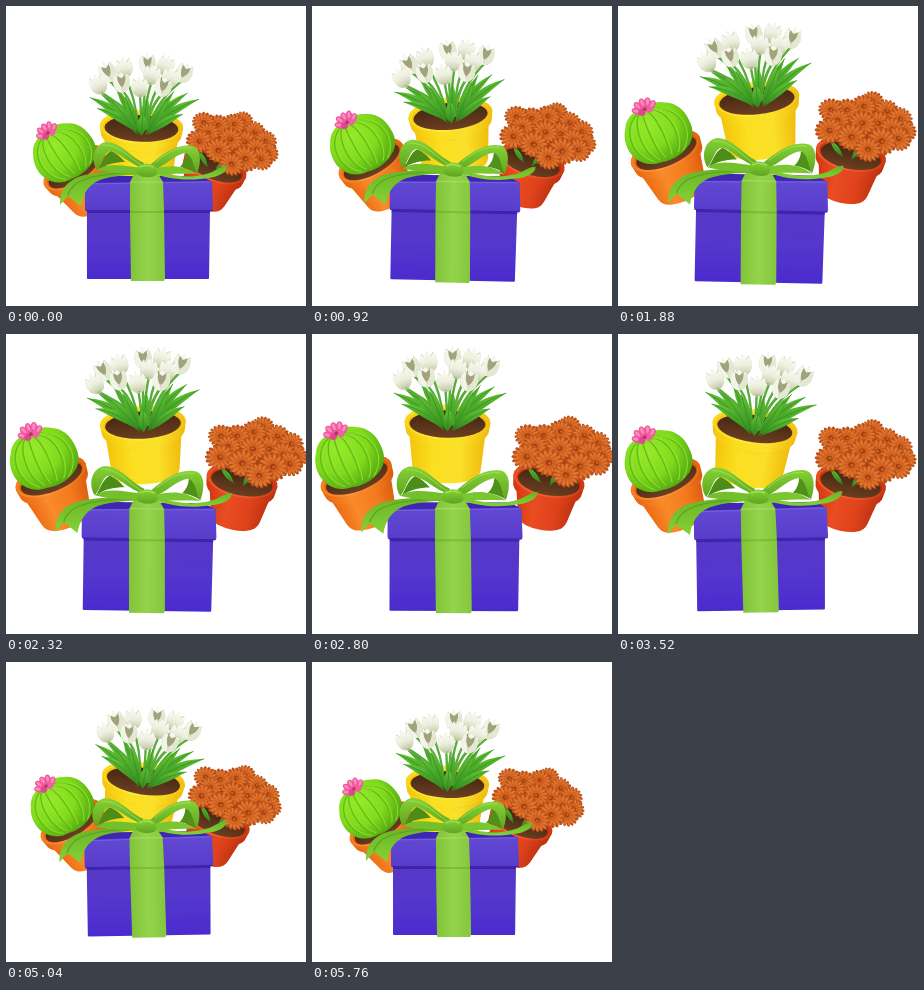
An HTML page for the animation above (5.8 s loop, 300x300 px).

```html
<!DOCTYPE html>
<html lang="en">
<head>
<meta charset="utf-8">
<title>Gift with potted flowers</title>
<style>
html, body { margin: 0; width: 100%; height: 100%; overflow: hidden; background: #fff; }
svg { display: block; width: 100vw; height: 100vh; }
</style>
</head>
<body>
<svg id="stage" viewBox="0 0 300 300" xmlns="http://www.w3.org/2000/svg"></svg>
<script>
const LOOP = 5800;
const TAU = Math.PI * 2;
const stage = document.getElementById('stage');

const path = (d, fill, extra = '') => `<path d="${d}" fill="${fill}" ${extra}/>`;
const line = (d, color, width) =>
  `<path d="${d}" fill="none" stroke="${color}" stroke-width="${width}" stroke-linecap="round"/>`;
const oval = (x, y, rx, ry, fill, extra = '') =>
  `<ellipse cx="${x}" cy="${y}" rx="${rx}" ry="${ry}" fill="${fill}" ${extra}/>`;
const stops = colors => colors.map((c, i) =>
  `<stop offset="${i / (colors.length - 1)}" stop-color="${c}"/>`).join('');
const across = (id, ...colors) => `<linearGradient id="${id}">${stops(colors)}</linearGradient>`;
const down = (id, ...colors) =>
  `<linearGradient id="${id}" x2="0" y2="1">${stops(colors)}</linearGradient>`;
const ring = (n, turn, draw) => Array.from({ length: n }, (_, i) =>
  `<g transform="rotate(${turn + i * 360 / n})">${draw}</g>`).join('');

const defs = `<defs>
  ${across('yellow', '#f3c30c', '#fbdf20', '#fbe02a', '#efb90a')}
  ${across('yellowRim', '#fbd514', '#fdea3e', '#fce02a', '#f3c010')}
  ${across('orange', '#e9650f', '#f98a2a', '#f47b1e', '#d8590d')}
  ${across('orangeRim', '#f47c1e', '#fc983e', '#f68326', '#e4660f')}
  ${across('red', '#cf3510', '#ea4d22', '#e0431c', '#b9300f')}
  ${across('redRim', '#ea4f20', '#f46834', '#ec5325', '#c93812')}
  ${down('soil', '#41220f', '#6b3f22')}
  ${down('front', '#5639c6', '#5437cc', '#4b2bce')}
  ${down('lid', '#6149d2', '#583dcc')}
  ${across('band', '#80c238', '#94d44c', '#84c63c')}
  ${down('loop', '#86d236', '#5da51f')}
  ${down('tail', '#69b325', '#84d236')}
  ${down('leaf', '#63c235', '#2f8a1d')}
  ${down('petal', '#fafbf4', '#eceedd', '#bfc7a2')}
  <radialGradient id="cactusSkin" cx=".42" cy=".3" r=".75">
    <stop offset="0" stop-color="#98ea2a"/><stop offset=".55" stop-color="#80da1c"/>
    <stop offset="1" stop-color="#4fa30f"/>
  </radialGradient>
  <g id="daisyHead">
    ${ring(17, 0, oval(0, -9.5, 2.1, 5, '#b85018'))}
    ${ring(15, 9, oval(0, -8, 1.6, 5, '#de742f'))}
    ${ring(11, 4, oval(0, -4.8, 1.3, 3.6, '#d0601f'))}
    ${oval(0, 0, 3, 2.8, '#9b3d12')}
    ${oval(-.4, -.6, 1.7, 1.5, '#c9611f')}
  </g>
  <g id="tulipHead">
    ${path('M-6-9C-11-1-9 10 0 11C9 10 11-1 6-9L2-5L0-11L-3-5Z', '#d5dabd')}
    ${path('M-6.5-8C-11 0-8 10 0 11C0 2-2-4-6.5-8Z', 'url(#petal)')}
    ${path('M6.5-8C11 0 8 10 0 11C0 2 2-4 6.5-8Z', 'url(#petal)')}
    ${path('M0-10C-7-4-6 7 0 11C6 7 7-4 0-10Z', 'url(#petal)')}
    ${path('M-3.5 6C-2 10 2 10 3.5 6L0 11Z', '#a3ab7d')}
  </g>
  <g id="tulipOpen">
    <use href="#tulipHead"/>
    ${path('M-4-7C-5 0-2 4 0 5C3 3 5-1 4-7L0-4Z', '#a0a37c')}
    ${path('M-6-8C-11 1-8 10 0 11C1 7-4 2-6-8Z', '#f3f4e8')}
    ${path('M6-8C11 1 8 10 0 11C-1 7 4 2 6-8Z', '#e4e8d2')}
  </g>
</defs>`;

// Upright pot with its rim centred on the origin
function pot(color, rx, ry, foot, height) {
  const r = rx * .97, neck = rx * .9;
  return path(`M${-neck} 6L${-foot - 2} ${height - 4}Q${-foot - 1} ${height} ${-foot + 1} ${height + 2}
      A${foot} ${ry * .55} 0 0 0 ${foot - 1} ${height + 2}Q${foot + 1} ${height} ${foot + 2} ${height - 4}
      L${neck} 6Z`, `url(#${color})`) +
    path(`M${-neck} 9A${neck} ${ry} 0 0 0 ${neck} 9L${neck - .6} 12A${neck} ${ry} 0 0 1 ${.6 - neck} 12Z`,
      '#8a3a00', 'opacity=".22"') +
    path(`M${-rx} 0L${-r} 8A${r} ${ry} 0 0 0 ${r} 8L${rx} 0Z`, `url(#${color})`) +
    oval(0, 0, rx, ry, `url(#${color}Rim)`) +
    oval(0, .8, rx - 3.5, ry - 2.5, `url(#${color})`) +
    oval(0, 2, rx - 5, ry - 3.8, 'url(#soil)');
}

// Pointed blade from its foot (x, y) to its tip (a, b)
function blade(x, y, a, b, width, bend = 0) {
  const len = Math.hypot(a - x, b - y);
  const nx = (y - b) / len, ny = (a - x) / len;
  const mx = (x + a) / 2 + nx * bend, my = (y + b) / 2 + ny * bend;
  const q = k => `${mx + nx * width * k} ${my + ny * width * k}`;
  return path(`M${x} ${y}Q${q(1)} ${a} ${b}Q${q(-1)} ${x} ${y}Z`, 'url(#leaf)') +
    line(`M${x} ${y}Q${q(0)} ${a} ${b}`, '#318a1e', .7);
}

function tulipPot() {
  const heads = [[4, -65, 1], [-20, -60, 0], [23, -64, 0], [-37, -55, 1], [42, -57, 1],
    [9, -54, 0], [28, -52, 0], [-46, -42, 0], [-22, -45, 1], [-3, -41, 0], [21, -42, 1]];
  const stems = heads.map(([x, y]) => line(`M${x * .16} 2Q${x * .35} ${y * .5} ${x} ${y + 7}`, '#58ad38', 2.4));
  const blooms = heads.map(([x, y, open], i) =>
    `<use href="#${open ? 'tulipOpen' : 'tulipHead'}" transform="translate(${x} ${y}) rotate(${x * .55 + (i % 3 - 1) * 5})"/>`);
  const back = [[-6, 0, -42, -31, 8, 5], [8, 0, 46, -36, 7, -5], [-3, 0, -27, -37, 7, 0], [6, 0, 32, -37, 7, 0]];
  const front = [[-7, 5, -54, -28, 8, 8], [-5, 6, -46, -17, 8, 7], [7, 4, 58, -30, 8, -7],
    [7, 8, 42, -14, 8, -5], [-2, 7, -18, -30, 9, 0], [1, 8, 5, -31, 9, 0], [5, 8, 25, -29, 9, 0],
    [-4, 8, -31, -25, 8, 2], [0, 9, 1, -13, 10, 0]];
  const blades = list => list.map(b => blade(...b)).join('');
  return pot('yellow', 43, 17.5, 32, 52) + blades(back) + stems.join('') + blades(front) + blooms.join('');
}

function cactusPot() {
  const ribs = [-29, -19, -8, 5, 18, 28].map(x =>
    line(`M${-5 + x * .12} -46C${x * 1.05} -42 ${x * 1.25} -9 ${x * .55} 7`, '#62ba14', 1.3) +
    line(`M${-3 + x * .12} -45C${x * 1.05 + 2} -41 ${x * 1.25 + 2} -9 ${x * .55 + 2} 6`, '#96e636', .8)).join('');
  const ball = path('M-8-48C-17-50-26-43-29-36C-35-28-36-15-32-7C-28 3-18 9-8 9C2 12 14 10 22 5C31 1 35-9 34-19C34-31 28-41 19-45C10-51 1-51-8-48Z', 'url(#cactusSkin)');
  const bloom = [[-8, 0, -55], [8, 0, 55], [-5, -4, -25], [5, -4, 25], [0, -5, 0]].map(([x, y, a]) =>
    oval(0, 0, 3.5, 5.6, '#ee5a9d', `transform="translate(${x} ${y}) rotate(${a})"`) +
    oval(0, -1, 1.5, 3.4, '#ff8cbf', `transform="translate(${x} ${y}) rotate(${a})"`)).join('');
  return pot('orange', 37.5, 17, 24, 46) + ball + ribs +
    `<g transform="translate(-3 -48)">${bloom}${oval(-4, 3, 3.6, 3.4, '#e34690')}${oval(4, 3, 3.6, 3.4, '#f0629f')}${oval(0, 1, 2, 1.8, '#c22c70')}</g>`;
}

function daisyPot() {
  const heads = [[11, -57, .8], [27, -50, .9], [42, -45, .9], [3, -50, .9], [-13, -43, .9],
    [-29, -40, .9], [49, -34, .85], [-20, -31, .9], [21, -36, 1], [5, -33, 1], [36, -33, .95],
    [44, -25, .95], [-26, -19, 1.05], [28, -19, 1.1], [-3, -17, 1.1], [16, -8, 1]];
  return pot('red', 36, 17, 23, 42) +
    path('M-31-34C-24-48 2-54 16-55C32-53 49-43 49-31C46-17 32-4 18-2C0-5-20-6-31-17Z', '#8f3911') +
    blade(-8, 4, -23, -9, 5) + blade(2, 5, 8, -12, 5) +
    heads.map(([x, y, s], i) =>
      `<use href="#daisyHead" transform="translate(${x} ${y}) rotate(${x * .5}) scale(${s} ${s * .88}) rotate(${i * 37})"/>`).join('');
}

function gift() {
  const box =
    path('M81 200H204L203 272Q203 273 202 273H82Q81 273 81 272Z', 'url(#front)') +
    path('M81 204H204V207H81Z', '#2e1797', 'opacity=".6"') +
    path('M79 178L94 170H195L206 176L204 180H82Z', '#3f27b4') +
    path('M79 178Q79 177 82 177L203 175Q206 175 206 177L207 203Q207 205 205 205H81Q79 205 79 203Z', 'url(#lid)') +
    line('M81 178L204 176', '#7b66de', .8) +
    line('M80 204.5H206', '#351da3', .8);
  const band =
    path('M128 168H152L157 176L158 205L159 273L158 275H125L124 205V176Z', 'url(#band)') +
    path('M124 205H158V207H124Z', '#5a9f20', 'opacity=".4"') +
    line('M125 176H156', '#a2de62', 1);
  // Each loop is a strip seen edge-on, open in the middle
  const bow =
    path('M146 163C166 171 185 172 200 168C209 166 214 160 221 160C222 165 214 171 201 172C179 176 160 172 146 167Z', 'url(#tail)') +
    path('M134 163C116 166 89 165 72 171C59 177 54 185 54 199L62 190L75 200C77 188 82 179 94 174C109 169 124 169 139 168Z', 'url(#tail)') +
    line('M132 165C111 168 86 168 71 177C66 181 63 185 62 189', '#5ea31f', 1.2) +
    path('M92 164C97 156 98 149 105 145C110 147 115 151 119 156C110 156 100 158 92 164Z', '#4c8d18') +
    path('M137 162C122 157 114 147 105 145C98 145 97 157 91 164C84 153 88 138 100 136C115 136 123 150 138 157Z', 'url(#loop)') +
    path('M137 162C120 160 102 156 91 164C103 167 120 168 137 167Z', '#74c02c') +
    path('M180 147C188 148 187 160 191 167C186 164 181 162 174 161C178 157 180 152 180 147Z', '#4f9119') +
    path('M145 158C156 149 170 137 187 140C196 143 195 158 191 168C187 160 187 150 180 147C169 148 159 160 148 164Z', 'url(#loop)') +
    path('M147 163C160 160 174 157 191 168C177 167 160 169 146 167Z', '#7ac630') +
    line('M97 139C113 138 123 152 135 159M150 156C160 147 172 140 185 142', '#a0de5a', .9) +
    path('M132 160Q141 155 149 160Q153 165 149 170Q140 173 132 169Q129 164 132 160Z', 'url(#loop)') +
    line('M134 161Q141 158 147 161', '#a5e75c', 1);
  return `<g transform="translate(-142 -200)">${box}${band}${bow}</g>`;
}

const parts = { cactus: cactusPot(), daisy: daisyPot(), tulip: tulipPot(), gift: gift() };
stage.innerHTML = defs + Object.keys(parts).map(id => `<g id="${id}">${parts[id]}</g>`).join('');

function place(id, x, y, turn, size) {
  document.getElementById(id).setAttribute('transform',
    `translate(${x} ${y}) rotate(${turn}) scale(${size})`);
}

function draw() {
  const t = performance.now() % LOOP;
  const a = TAU * t / LOOP;
  const e = .5 + .5 * Math.cos(TAU * (t - 2700) / LOOP);
  const p = e + .27 * e * (1 - e); // spread: 0 gathered, 1 fully apart

  place('cactus', 68 - 24 * p, 162 - 20 * p, -33 + 12 * p, .92 + .08 * p);
  place('daisy', 209 + 28 * p, 160 - 14 * p, 21 - 11 * p, .91 + .09 * p);
  place('tulip', 137.5 - 2 * Math.cos(2 * a), 121 - 33 * p, 2 - 9 * Math.sin(a), .97 + .03 * p);
  place('gift', 142, 200, 1.3 * Math.sin(a), 1 + .055 * p);
  requestAnimationFrame(draw);
}
draw();
</script>
</body>
</html>
```
